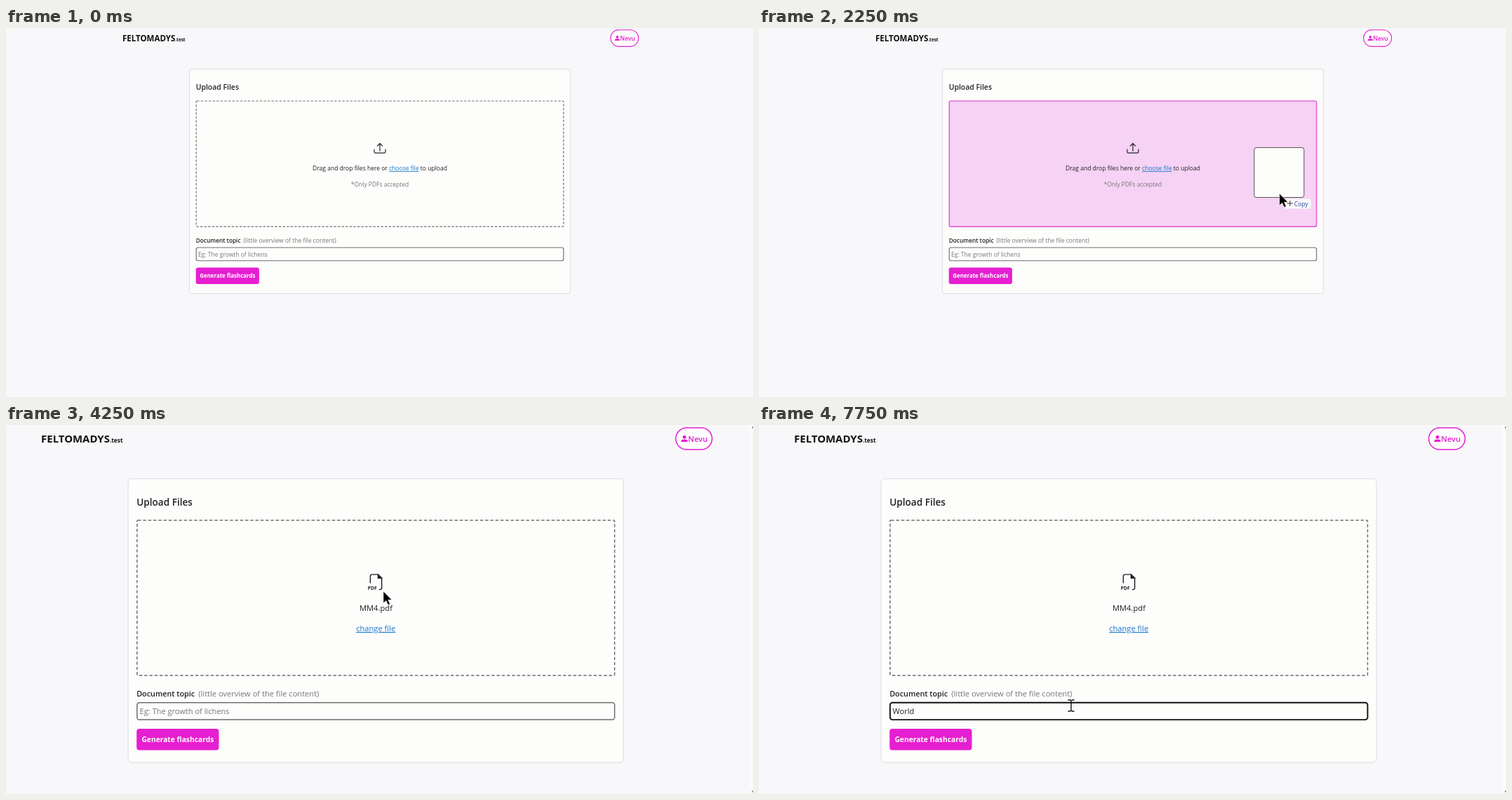
An HTML page for the animation above (8000 ms loop, 1065x526 px).

```html
<!DOCTYPE html>
<html lang="en">
<head>
<meta charset="utf-8">
<title>Flashcard upload</title>
<style>
  html, body { margin: 0; width: 100%; height: 100%; overflow: hidden; background: #f8f8fb; }
  svg { display: block; }
  text { font-family: "Open Sans", "Noto Sans", sans-serif; white-space: pre; }
  .link { fill: #1676cc; text-decoration: underline; }
  .hidden { display: none; }
</style>
</head>
<body>
<svg id="stage" width="1065" height="526" viewBox="0 0 1065 526"></svg>
<script>
const PINK = '#e61fd0', INK = '#222', GREY = '#777', PAPER = '#fdfdfc', LINE = '#6e6e6e';
const stage = document.getElementById('stage');

// One page layout; k is the browser zoom, (ox, oy) the page offset.
function page(id, { k = 1, ox = 0, oy = 0, file = false, drop = false, focus = false }) {
  const X = x => k * x + ox, Y = y => k * y + oy;
  const low = file ? -9 : 0;
  const thin = 1.15 * k;

  const box = (x1, y1, x2, y2, r, attrs) =>
    `<rect x="${X(x1)}" y="${Y(y1)}" width="${(x2 - x1) * k}" height="${(y2 - y1) * k}" rx="${r * k}" ${attrs}/>`;
  const text = (x, y, size, fill, str, attrs = '') =>
    `<text x="${X(x)}" y="${Y(y)}" font-size="${size * k}" fill="${fill}" ${attrs}>${str}</text>`;
  const icon = (body, attrs) => `<g transform="translate(${ox} ${oy}) scale(${k})" ${attrs}>${body}</g>`;
  const mid = 'text-anchor="middle"', semi = 'font-weight="600"', bold = 'font-weight="700"';

  const header =
    text(166, 18.5, 11.5, '#111', `FELTOMADYS<tspan font-size="${6.4 * k}">.test</tspan>`, bold) +
    box(862, 2.7, 901.8, 26.4, 11.8, `fill="${PAPER}" stroke="${PINK}" stroke-width="${thin}"`) +
    icon('<circle cx="871.5" cy="12.8" r="1.9"/><path d="M868 18v-.8q0-1.9 3.5-1.9t3.5 1.9v.8z"/>', `fill="${PINK}"`) +
    text(875.6, 18, 8.5, PINK, 'Nevu', semi);

  const zoneLook = drop
    ? `fill="#f6d2f4" stroke="#d833c6" stroke-width="${thin}"`
    : `fill="none" stroke="${LINE}" stroke-width="${thin}" stroke-dasharray="${3.4 * k} ${2.2 * k}"`;

  const content = file
    ? icon('<path d="M527 173v-7.5a2 2 0 0 1 2-2h6.5l4 4v10.5a2 2 0 0 1-2 2h-1"/>' +
           '<path d="M535.5 163.5v4h4z" fill="#222"/>', `fill="none" stroke="${INK}" stroke-width="1.1"`) +
      text(524.2, 180, 5.2, INK, 'PDF', bold) +
      text(533.2, 203.2, 8.6, INK, 'MM4.pdf', mid) +
      text(533, 225.7, 8.55, INK, '<tspan class="link">change file</tspan>', mid)
    : icon('<path d="M525 173v3.6a1.6 1.6 0 0 0 1.6 1.6h12.8a1.6 1.6 0 0 0 1.6-1.6v-3.6"/>' +
           '<path d="M533 175.3v-10.6M529.3 168.2l3.7-3.7 3.7 3.7"/>',
           `fill="none" stroke="${INK}" stroke-width="1.2" stroke-linecap="round" stroke-linejoin="round"`) +
      text(533, 203.2, 8.52, INK, 'Drag and drop files here or <tspan class="link">choose file</tspan> to upload', mid) +
      text(533, 225.7, 8.45, GREY, '*Only PDFs accepted', mid);

  const field = focus ? 'stroke="#111" stroke-width="1.9"' : `stroke="${LINE}" stroke-width="${thin}"`;
  const form =
    text(270.7, 306 + low, 8.3, INK, 'Document topic', semi) +
    text(338.4, 306 + low, 8.55, GREY, '(little overview of the file content)') +
    box(271.2, 313 + low, 794.9, 331.7 + low, 2.6, `fill="${PAPER}" ${field}`) +
    text(274, 325.7 + low, 8.5, GREY, 'Eg: The growth of lichens', 'class="entry"') +
    box(270.7, 341.6 + low, 360.9, 365 + low, 3, `fill="${PINK}"`) +
    text(315.8, 356.3 + low, 7.9, '#fff', 'Generate flashcards', `${mid} ${bold}`);

  const scrollbar = k > 1
    ? '<path d="M1060 0h5v526h-5z" fill="#fbfbfc"/><path d="M1065 1.5v3h-2zM1065 521.5v3l-2-3z" fill="#666"/>'
    : '';

  return `<g id="${id}" class="hidden">` + header +
    box(261.4, 58.5, 804.6, 378.6 + low, 4, `fill="${PAPER}" stroke="#dcdce0"`) +
    text(270.7, 88, 10.45, INK, 'Upload Files', semi) +
    box(271.2, 104, 794.9, 283.1 + low, drop ? 2 : 1, zoneLook) +
    content + form + scrollbar + '</g>';
}

const arrow = '<path d="M0 0V16.8L3.9 13.4 6.8 19.6 9.6 18.4 6.8 12.3H12Z" fill="#000" stroke="#fff" stroke-width=".6"/>';
const pointers = {
  arrow,
  drag:
    `<rect x="-36" y="-65.5" width="71" height="71" rx="3" fill="${PAPER}" stroke="#555"/>` +
    '<rect x="7" y="7.5" width="38" height="14" rx="2" fill="#fafafd" stroke="#ebebf1" stroke-width=".8"/>' +
    '<path d="M11 14h8M15 10v8" stroke="#333"/>' +
    '<text x="21" y="17.5" font-size="8.5" fill="#2c479c">Copy</text>' + arrow,
  hand:
    '<path d="M-1.8 1.6Q-1.8 0 0 0T1.8 1.6V7.6L8 9.3Q10.5 10 10.3 12.5L9.5 17Q8.8 21.3 6 21.5H1' +
    'Q-1.5 21.4-3 18L-6.7 12.8Q-7 10.6-4.8 10.7L-1.8 13.6Z" fill="#000" stroke="#fff" stroke-width=".6"/>',
  beam:
    '<path d="M-4.5-8H-1.5L0-7 1.5-8H4.5M0-7V7M-4.5 8H-1.5L0 7 1.5 8H4.5" fill="none" stroke="#111" stroke-width="1.4"/>'
};

const zoomed = { k: 1.3, ox: -165.7, oy: 0.6, file: true };
const pages = {
  empty: {},
  drop: { drop: true },
  file: { file: true },
  zoom: zoomed,
  focus: { ...zoomed, focus: true }
};
const pageIds = Object.keys(pages), pointerIds = Object.keys(pointers);
stage.innerHTML =
  pageIds.map(n => page(n, pages[n])).join('') +
  '<path id="caret" class="hidden" d="M191 400.5v16" stroke="#111"/>' +
  pointerIds.map(n => `<g id="${n}" class="hidden">${pointers[n]}</g>`).join('');

const el = id => document.getElementById(id);
const entry = document.querySelector('#focus .entry');
const hint = entry.textContent;

// start ms, page, pointer, x, y
const moves = [
  [0, 'empty'],
  [1750, 'empty', 'drag', 995, 330],
  [2000, 'empty', 'drag', 890, 261],
  [2250, 'drop', 'drag', 742, 236],
  [2500, 'drop', 'drag', 628, 232],
  [2750, 'drop', 'drag', 562, 231],
  [3000, 'drop', 'drag', 540, 230.5],
  [3250, 'file', 'hand', 540, 227],
  [3750, 'file', 'arrow', 539, 233],
  [4000, 'file', 'arrow', 538, 237],
  [4250, 'zoom', 'arrow', 538, 237],
  [4750, 'zoom', 'arrow', 512, 322],
  [5000, 'zoom', 'arrow', 468, 368],
  [5250, 'focus', 'beam', 447, 401],
  [5500, 'focus', 'beam', 445, 400]
];
const typing = [
  [0, ''], [6250, 'W'], [6500, 'Wr'], [6750, 'Wrol'], [7000, 'Wrold'],
  [7250, 'Wrold war'], [7500, 'W'], [7750, 'World']
];
const LOOP = 8000;
const at = (rows, t) => rows.findLast(row => row[0] <= t);
const show = (id, on) => el(id).classList.toggle('hidden', !on);

function draw(t) {
  const [, scene, pointer, x, y] = at(moves, t);
  for (const id of pageIds) show(id, id === scene);
  for (const id of pointerIds) show(id, id === pointer);
  if (pointer) el(pointer).setAttribute('transform', `translate(${x} ${y})`);
  show('caret', t >= 5250 && t < 5750);

  const typed = at(typing, t)[1];
  entry.textContent = typed || hint;
  entry.setAttribute('fill', typed ? INK : GREY);
}

let start;
function tick(now) {
  start ??= now;
  draw((now - start) % LOOP);
  requestAnimationFrame(tick);
}
draw(0);
requestAnimationFrame(tick);
</script>
</body>
</html>
```
